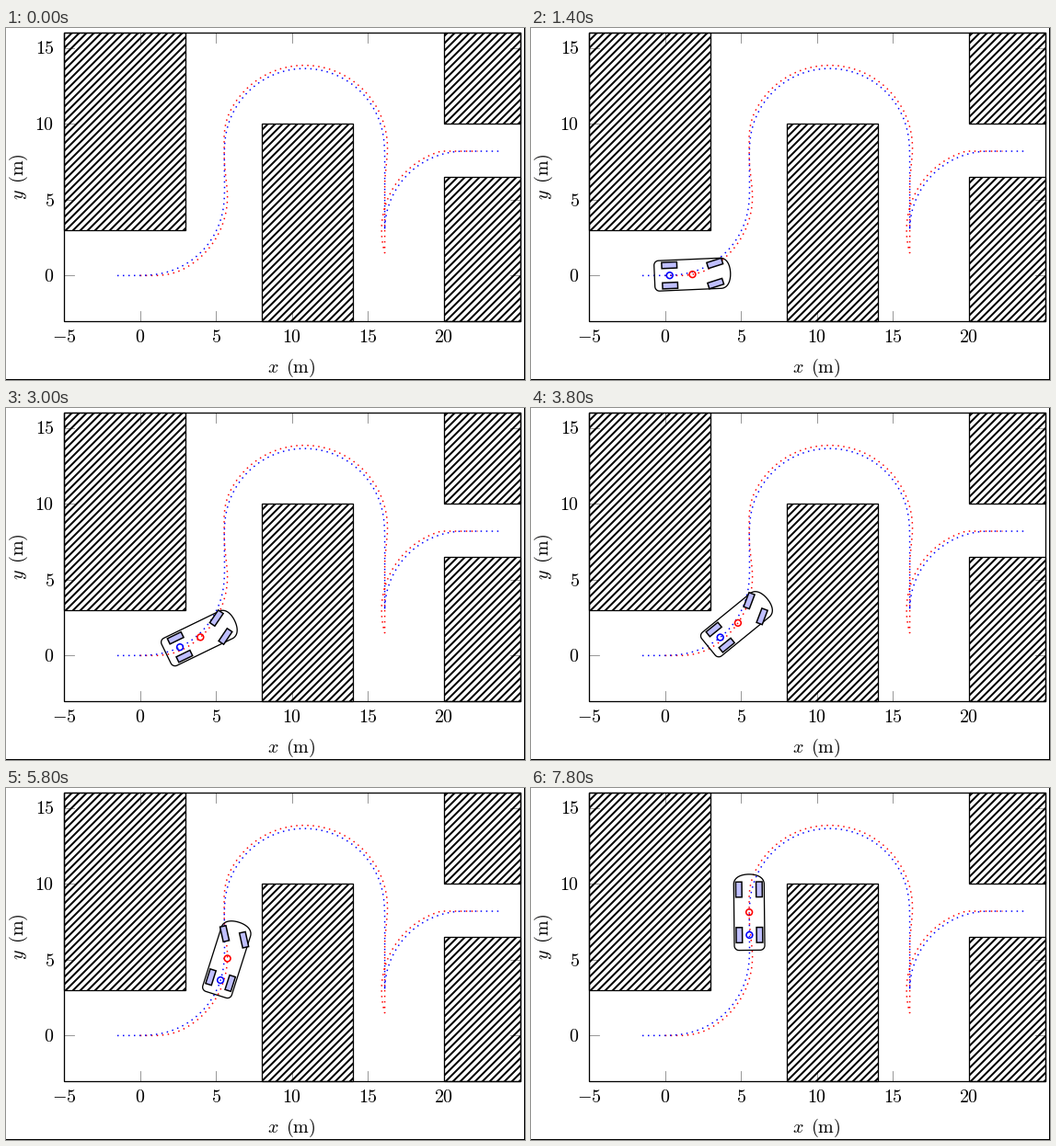
Write a matplotlib script that moves like this. It is 564 by 383 pixels and loops after 8 s.

```python
import numpy as np
import matplotlib.pyplot as plt
from matplotlib.animation import FuncAnimation
from matplotlib.collections import LineCollection
from matplotlib.patches import Circle, Polygon, Rectangle

plt.rcParams["mathtext.fontset"] = "cm"

W, H, DPI = 564, 383, 100
PX = 72 / DPI                       # points per pixel
X0, Y0, SCALE = 145.6, 269.4, 16.52  # world origin and pixels per metre
STEP, FRAMES = 0.3, 40              # metres per frame
DS = 0.01
BASE = 3.0                          # wheelbase


def px(x, y):
    return X0 + SCALE * np.asarray(x), Y0 - SCALE * np.asarray(y)


# --- vehicle path (rear axle) ---
def turn(s, start, end, soft=2.0):
    """Steering profile: eases in around start and out around end."""
    rise = lambda c: np.clip((s - c) / soft + 0.5, 0, 1)
    return rise(start) - rise(end)


def drive(pose, curv, sign=1):
    x, y, a = pose
    a = a + sign * DS * np.cumsum(curv)
    x = x + sign * DS * np.cumsum(np.cos(a))
    y = y + sign * DS * np.cumsum(np.sin(a))
    return x, y, a


R1, R2, R3 = 5.18, 5.25, 5.2
A1, A2 = np.radians(90.6), np.radians(180.6)
s = np.arange(0, 35.06, DS)
curv = turn(s, 1.86, 1.86 + A1 * R1) / R1 - turn(s, 13.12, 13.12 + A2 * R2) / R2
fx, fy, fa = drive((-1.5, 0, 0), curv)

back = np.arange(0, R3 * np.pi / 2 + 2.4, DS)
back_curv = np.where(back < R3 * np.pi / 2, 1 / R3, 0)
bx, by, ba = drive((fx[-1], fy[-1], fa[-1]), back_curv, -1)

rear_x, rear_y, head = (np.concatenate(p) for p in ((fx, bx), (fy, by), (fa, ba)))
mid_x = rear_x + BASE / 2 * np.cos(head)
mid_y = rear_y + BASE / 2 * np.sin(head)

# --- stage ---
fig = plt.figure(figsize=(W / DPI, H / DPI), dpi=DPI, facecolor="white")
ax = fig.add_axes([0, 0, 1, 1])
ax.set_xlim(0, W)
ax.set_ylim(H, 0)
ax.axis("off")


def line(xs, ys, color="black", width=1.0, z=2, **kw):
    return ax.plot(xs, ys, color=color, lw=width * PX, zorder=z, **kw)[0]


def box(x1, y1, x2, y2, width=1.3, z=4):
    (l, r), (b, t) = px((x1, x2), (y1, y2))
    return ax.add_patch(Rectangle((l, t), r - l, b - t, fill=False, ec="black",
                                  lw=width * PX, zorder=z))


def label(x, y, text, **kw):
    ax.text(x, y, text, fontsize=20 * PX, **{"ha": "center", "va": "baseline", **kw})


left, bottom = px(-5, -3)
right, top = px(25, 16)
TICK = 11
for v in range(-5, 21, 5):
    x = px(v, 0)[0]
    label(x, 341.5, f"${v}$")
    for edge, d in ((bottom, -TICK), (top, TICK)):
        line([x, x], [edge, edge + d], "gray", 0.8, 1)
for v in range(0, 16, 5):
    y = px(0, v)[1]
    label(52.5, y + 6.8, f"${v}$", ha="right")
    for edge, d in ((left, TICK), (right, -TICK)):
        line([edge, edge + d], [y, y], "gray", 0.8, 1)
label(310.5, 374.5, r"$x\ \,\mathrm{(m)}$")
label(19, 162, r"$y\ \,\mathrm{(m)}$", rotation=90, rotation_mode="anchor")

# --- hatched obstacles ---
for rect in ((-5, 3, 3, 16), (8, -3, 14, 10), (20, 10, 25, 16), (20, -3, 25, 6.5)):
    wall = box(*rect)
    hatch = LineCollection([[(c, 0), (c - H, H)] for c in range(5, W + H, 8)],
                           colors="black", linewidths=2 * PX, zorder=2)
    ax.add_collection(hatch)
    hatch.set_clip_path(wall)
box(-5, -3, 25, 16)
line([W - 0.5, W - 0.5], [0, H], z=6, snap=False)
line([0, W], [H - 0.5, H - 0.5], z=6, snap=False)

# --- dotted tracks ---
DOT = 1.5
for xs, ys, color in ((mid_x, mid_y, "red"), (rear_x, rear_y, "blue")):
    line(*px(xs, ys), color, DOT, 5, dashes=(1, 3), dash_capstyle="butt")

# --- car, in its own frame: x forward from the rear axle ---
t = np.linspace(0, 1, 16)[:, None]
nose = ((1 - t) ** 3 * (3.4, 1) + 3 * t * (1 - t) ** 2 * (3.85, 0.95)
        + 3 * t ** 2 * (1 - t) * (4, 0.45) + t ** 3 * (4, 0))
q = np.linspace(0, np.pi / 2, 8)[:, None]
tail = np.hstack([-0.7 - 0.3 * np.cos(q), 0.7 + 0.3 * np.sin(q)])
half = np.vstack([tail, nose])
BODY = np.vstack([half, (half * (1, -1))[::-1]])
TYRE = np.array([(-0.5, -0.2), (0.5, -0.2), (0.5, 0.2), (-0.5, 0.2)])
HUBS = [(0, 0.67), (0, -0.67), (BASE, 0.67), (BASE, -0.67)]


def rotate(pts, a):
    c, n = np.cos(a), np.sin(a)
    return np.asarray(pts) @ np.array([[c, n], [-n, c]])


def part(fill, width):
    return ax.add_patch(Polygon([(0, 0)] * 3, closed=True, fc=fill, ec="black",
                                lw=width * PX, zorder=7))


def ring(color):
    return ax.add_patch(Circle((0, 0), 3.4, fill=False, ec=color, lw=1.6 * PX, zorder=8))


body = part("none", 1.3)
tyres = [part("#bfbfff", 1.5) for _ in HUBS]
rear, mid = ring("blue"), ring("red")
car = [body, *tyres, rear, mid]


def update(k):
    for p in car:
        p.set_visible(k > 0)
    i = int(round(max(k - 1, 0) * STEP / DS))
    x, y, a = rear_x[i], rear_y[i], head[i]
    steer = np.arctan(BASE * curv[i])

    def place(pts):
        return np.column_stack(px(*(rotate(pts, a) + (x, y)).T))

    body.set_xy(place(BODY))
    for tyre, hub in zip(tyres, HUBS):
        tyre.set_xy(place(rotate(TYRE, steer if hub[0] else 0) + hub))
    rear.center = px(x, y)
    mid.center = px(mid_x[i], mid_y[i])
    return car


anim = FuncAnimation(fig, update, frames=FRAMES, interval=200, repeat=True,
                     repeat_delay=0, blit=False)
plt.show()
```
